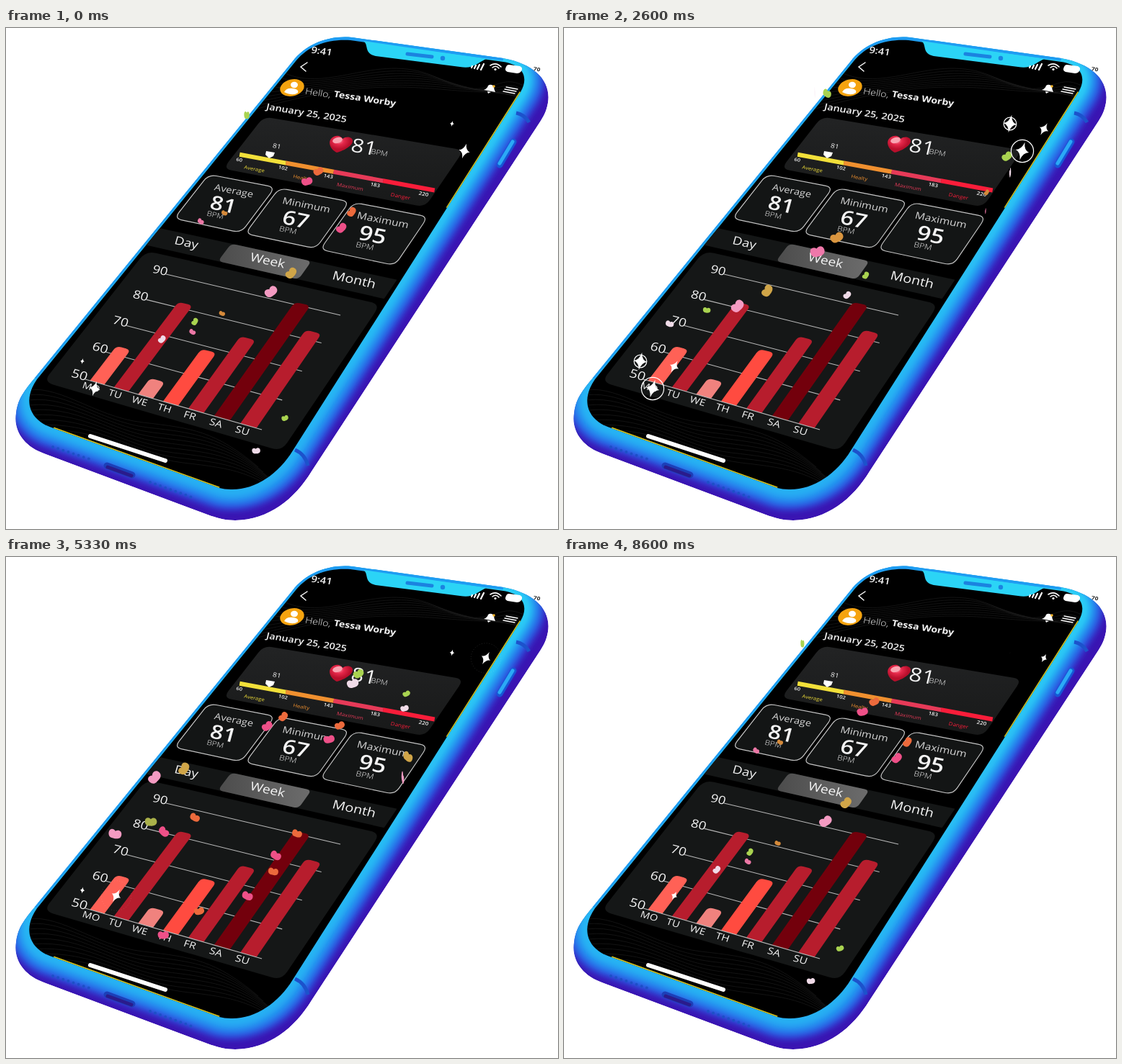
These frames come from a looping animation (766 by 696 pixels, 8630 ms). An HTML page with a canvas:

```html
<!DOCTYPE html>
<html lang="en">
<head>
<meta charset="utf-8">
<title>Heart rate app</title>
<style>
  html, body { margin: 0; width: 100%; height: 100%; overflow: hidden; background: #fff; }
  svg, canvas { position: absolute; left: 0; top: 0; width: 766px; height: 696px; }
  text { font-family: "Open Sans", "Noto Sans", sans-serif; text-anchor: middle; }
</style>
</head>
<body>
<svg viewBox="0 0 766 696">
  <defs>
    <path id="body" d="M40 486L398 46C415 24 445 10 480 13L690 42C735 50 757 75 752 104C750 115 747 121 742 129L424 616C400 655 365 683 318 684C305 684 295 681 285 678L55 592C25 582 10 560 14 535C16 515 26 503 40 486Z"/>
    <path id="screen" d="M43 488L402 46C420 24 447 15 478 17L690 47C715 51 727 66 714 89L398 587C378 620 345 642 312 641Q303 641 296 639L66 556C33 546 22 518 43 488Z"/>
    <clipPath id="inBody"><use href="#body"/></clipPath>
    <clipPath id="inScreen"><use href="#screen"/></clipPath>
    <filter id="soft" x="-10%" y="-10%" width="120%" height="120%"><feGaussianBlur stdDeviation="5"/></filter>
    <linearGradient id="rim" x1="0" y1="0" x2="0" y2="1"><stop stop-color="#2bd0f6"/><stop offset="1" stop-color="#27b0f3"/></linearGradient>
    <linearGradient id="card" x1="0" y1="0" x2="0" y2="1"><stop stop-color="#222324"/><stop offset="1" stop-color="#181919"/></linearGradient>
    <linearGradient id="pill"><stop stop-color="#4c4c4c"/><stop offset="1" stop-color="#6c6c6c"/></linearGradient>
    <radialGradient id="heart" cx=".4" cy=".3"><stop stop-color="#ff8fa4"/><stop offset=".45" stop-color="#e5284a"/><stop offset="1" stop-color="#b80f2c"/></radialGradient>
  </defs>

  <g clip-path="url(#inBody)">
    <use href="#body" fill="#3a14b2"/>
    <g fill="none" filter="url(#soft)">
      <use href="#screen" stroke="#2c5ae4" stroke-width="56"/>
      <use href="#screen" stroke="#248df0" stroke-width="38"/>
      <use href="#screen" stroke="url(#rim)" stroke-width="21"/>
    </g>
    <path d="M40 486L398 46C415 24 445 12 480 15L690 43" fill="none" stroke="#1e9cf2" stroke-width="5"/>
    <path d="M708 118Q719 120 726 131M401 586Q415 592 419 608" fill="none" stroke="#1c52cc" stroke-width="5"/>
    <g stroke-linecap="round">
      <path d="M704 158L685 190" stroke="#1557d6" stroke-width="9"/>
      <path d="M703 158L685 188" stroke="#2ba9f6" stroke-width="5"/>
      <path d="M140 608L175 621" stroke="#1c3fb8" stroke-width="9"/>
      <path d="M141 610L174 622" stroke="#2a1b8c" stroke-width="5"/>
      <path d="M65 582L116 599M200 631L258 652" stroke="#1d4fc8" stroke-width="4" stroke-dasharray="0 7.5"/>
    </g>
  </g>

  <use href="#screen" fill="#000"/>
  <g clip-path="url(#inScreen)">
    <g id="contours" fill="none" stroke="#191919" stroke-width=".8"/>
    <path d="M714 89L612 250M66 556L296 639" stroke="#d9c51f" stroke-width="3" fill="none"/>
    <g id="panels"></g>
  </g>
  <path d="M496 18C504 24 496 35 513 39L630 54C648 57 652 50 666 43Z" fill="#2bd4f6"/>
  <path d="M557 36L591 40" stroke="#1b83e0" stroke-width="5" stroke-linecap="round"/>
  <circle cx="606" cy="42" r="3.2" fill="#1b83e0"/>

  <g fill="none" stroke="#fff" stroke-linecap="round">
    <path d="M418 48L409 54L416 60" stroke-width="1.4"/>
    <path d="M647 53l-1 2M652 52l-2 4M657 51l-3 6M663 50l-4 8" stroke-width="2.2"/>
    <path d="M672 52Q680 47 687 54M675 55Q680 51 684 56" stroke-width="1.6"/>
    <path d="M694 82L710 85M692 85L708 88M690 88L706 91" stroke-width="1.3"/>
    <path d="M117 567L221 601" stroke-width="6"/>
  </g>
  <circle cx="679" cy="57.500" r="1.6" fill="#fff"/>
  <path d="M698 51L713 53Q718 55 715 60Q713 63 709 63L696 61Q691 59 694 54Q695 51 698 51Z" fill="#fff"/>
  <path d="M663 86Q668 84 669 80Q673 77 677 81Q677 85 679 89ZM668 88l5 1-4 2Z" fill="#fff"/>
  <circle cx="677" cy="81" r="1.8" fill="#f5b428"/>
  <ellipse cx="397" cy="83" rx="17" ry="11.500" transform="rotate(-14 397 83)" fill="#f5a30f"/>
  <ellipse cx="400" cy="79" rx="5" ry="4.200" fill="#fff"/>
  <path d="M386 89Q389 83 398 84Q407 85 405 90Q398 95 386 89Z" fill="#fff"/>

  <g id="info"></g>
  <path d="M459 173C449 168 446 157 453 152C459 148 465 150 467 154C472 150 480 151 481 156C482 163 470 170 459 173Z" fill="url(#heart)"/>
  <ellipse cx="460" cy="156" rx="7" ry="4" transform="rotate(-15 460 156)" fill="#f9a4b2"/>
  <path d="M361 171L373 173L371 178L365 181L360 176Z" fill="#fff"/>
</svg>
<canvas width="766" height="696"></canvas>

<script>
const LOOP = 8630, PULSE = 800;
const byId = id => document.getElementById(id);
const clamp = v => Math.max(0, Math.min(1, v));
const wrap = (v, n) => ((v % n) + n) % n;

// Perspective of the screen plane; the chart grid is the unit square.
const [a, b, c, d, e, f, g, h] = [212.4, -116.5, 222, 31.5, 126.1, 342, -0.0639, -0.0407];
const depth = (u, v) => 1 + g * u + h * v;
const project = (u, v) => {
  const w = depth(u, v);
  return [(a * u + b * v + c) / w, (d * u + e * v + f) / w];
};

// Box in the plane with rounded corners: radius r on top, low at the bottom.
function box(u1, v1, u2, v2, attrs, r = 0.1, low = r) {
  const pts = [project(u1, v1), project(u2, v1), project(u2, v2), project(u1, v2)];
  const toward = (p, q, dist) => {
    const k = dist / Math.hypot(q[0] - p[0], q[1] - p[1]);
    return [p[0] + (q[0] - p[0]) * k, p[1] + (q[1] - p[1]) * k];
  };
  const path = pts.map((p, i) => {
    const dist = i < 2 ? r : low;
    return `${i ? 'L' : 'M'}${toward(p, pts[(i + 3) % 4], dist)}Q${p} ${toward(p, pts[(i + 1) % 4], dist)}`;
  }).join('');
  return `<path d="${path}Z" ${attrs}/>`;
}

const row = (u1, u2, v, color, width) =>
  `<path d="M${project(u1, v)}L${project(u2, v)}" stroke="${color}" stroke-width="${width}"/>`;

// Text centred on a point of the plane, turned along its row.
function label(s, u, v, size, weight = 400, fill = '#f4f4f4') {
  const [x, y] = project(u, v);
  const slope = (d - g * y) / (a - g * x);
  const px = size / depth(u, v);
  return `<text transform="matrix(1.12 ${1.12 * slope} ${-slope - 0.05} .95 ${x} ${y})" y="${px * 0.36}" font-size="${px}" font-weight="${weight}" fill="${fill}">${s}</text>`;
}

const zones = [['Average', '#f2e03a'], ['Healty', '#f0902f'], ['Maximum', '#e63a58'], ['Danger', '#fa1d3a']];
const stats = [['Average', 81], ['Minimum', 67], ['Maximum', 95]];
const week = { MO: 62, TU: 81, WE: 55, TH: 68, FR: 75, SA: 90, SU: 82 };
const level = bpm => (90 - bpm) / 40;
const barColor = bpm =>
  bpm < 60 ? '#f0827e' : bpm < 65 ? '#ff6156' : bpm < 70 ? '#ff4b40' : bpm < 85 ? '#b71d2d' : '#73000c';

function drawContours() {
  let out = '';
  for (let k = 0; k < 63; k += 7) {
    out += `<path d="M${385 - k} ${62 + k}C${450 + k} ${92 - k / 2} ${520 + k} ${30 + k} ${600 + k} ${70 + k / 3}S${680 + k} ${50 + k} 730 ${88 + k}"/>`;
    out += `<path d="M20 ${505 + k}C${70 + k} ${490 + k} ${120 + k} ${540 + k} ${190 + k} ${548 + k}S${290 + k} ${560 + k} ${350 + k} ${610 + k}"/>`;
  }
  byId('contours').innerHTML = out;
}

function drawScreen() {
  const panels = [], info = [];

  info.push(
    label('9:41', -.09, -2.41, 14.5, 600), label('70', 1.14, -2.53, 7.5, 700, '#222'),
    label('Hello,', .071, -1.962, 13.4, 300), label('Tessa Worby', .351, -1.978, 13.2, 700),
    label('January 25, 2025', .092, -1.74, 13.4, 600));

  panels.push(box(-.13, -1.63, 1.05, -1.05, 'fill="url(#card)"', 12));
  info.push(label('81', .534, -1.502, 28, 500), label('BPM', .634, -1.472, 10.2, 300), label('81', .068, -1.362, 9.3, 500));
  zones.forEach(([name, color], i) => {
    const u = -.1 + i * .285;
    panels.push(row(u, u + .286, -1.215, color, 6));
    info.push(label(name, u + .14, -1.105, 7, 400, color));
  });
  [60, 102, 143, 183, 220].forEach((n, i) => info.push(label(n, -.08 + i * .27, -1.165, 6.9, 600)));

  stats.forEach(([name, bpm], i) => {
    const u = -.185 + i * .435, mid = u + .205;
    panels.push(box(u, -.97, u + .41, -.5, 'fill="#131515" stroke="#c4c4c4" stroke-width="1.2"', 11));
    info.push(label(name, mid, -.865, 13.2, 400, '#d6d6d6'), label(bpm, mid, -.72, 28.3, 600), label('BPM', mid, -.61, 10.2, 300));
  });

  const third = 1.4 / 3;
  panels.push(box(-.25, -.386, 1.15, -.21, 'fill="#141616"', 1));
  panels.push(box(-.25 + third, -.386, -.25 + 2 * third, -.21, 'fill="url(#pill)"', 7));
  ['Day', 'Week', 'Month'].forEach((s, i) => info.push(label(s, -.02 + i * .485, -.312, 16.4)));

  panels.push(box(-.2, -.16, 1.15, 1.11, 'fill="#151717"', 14));
  for (let n = 90; n > 50; n -= 10) panels.push(row(0, 1, level(n), '#b9b9b9', 1.1));
  for (let n = 90; n >= 50; n -= 10) info.push(label(n, -.046, level(n) - .023, 16));
  Object.entries(week).forEach(([day, bpm], i) => {
    const u = (i + .5) / 7;
    panels.push(box(u - .043, level(bpm) - .02, u + .043, 1, `fill="${barColor(bpm)}"`, 7, 0.1));
    info.push(label(day, u - .012, 1.045, 11.9));
  });
  panels.push(row(0, 1, 1, '#b9b9b9', 1.1));

  byId('panels').innerHTML = panels.join('');
  byId('info').innerHTML = info.join('');
}

const ctx = document.querySelector('canvas').getContext('2d');
const bean = new Path2D('M-9 -1C-9 -7 -3 -8 0 -4C3 -7 9 -6 9 0C9 6 3 7 -2 6C-7 6 -9 3 -9 -1Z');
const star = new Path2D('M0 -1Q.14 -.14 .75 0Q.14 .14 0 1Q-.14 .14 -.75 0Q-.14 -.14 0 -1Z');

// Petals drift in pairs; speed is the sideways pixels per second.
const kind = (lead, mate, size, speed) => ({ lead, mate, size, speed });
const coral = kind('#ec6a3c', '#ee5088', .85, 102);
const ember = { ...coral, speed: 150 };
const crumb = kind('#d58a3a', '#ec78a6', .52, 109);
const gold = kind('#d0a548', '#f49bc2', 1, 142);
const brass = { ...gold, size: 1.05, speed: 101 };
const amber = kind('#d9953f', '#ef78aa', 1.1, 96);
const olive = kind('#aab14a', '#f49bc2', 1, 149);
const snow = kind('#a9d350', '#f0dbe8', .9, 108);
const mist = { ...snow, size: .64, speed: 131 };

// A wave is what drifts in around one moment: kind, x, y and climb per second.
const pairs = [];
const wave = (at, ...items) => items.forEach(([type, x, y, climb]) =>
  pairs.push({ ...type, at, x, y, climb, turn: pairs.length * 1.7 }));

wave(0, [crumb, 303, 257, 11], [snow, 334, 121, -22], [mist, 262, 408, 66], [mist, 387, 542, 60]);
wave(1000, [amber, 225, 299, 5], [mist, 209, 390, 29]);
wave(2600, [brass, 282, 365, 32], [mist, 198, 392, 74], [snow, 365, 91, 60]);
wave(3930, [coral, 242, 289, 48], [coral, 261, 415, 22], [coral, 228, 479, 30], [coral, 352, 554, 40], [snow, 338, 242, 57]);
wave(5330, [ember, 463, 234, 40], [ember, 262, 362, 60], [coral, 268, 492, 45], [brass, 247, 294, 60], [olive, 201, 368, 95]);
wave(7330, [coral, 301, 285, 66], [coral, 347, 327, 55], [coral, 346, 555, 40], [crumb, 158, 437, 31], [gold, 211, 386, 35], [gold, 412, 350, 32]);

// Petals narrow to nothing at the borders of the screen.
function openness(x, y, top) {
  const left = x - (400 - 0.809 * (y - 42)) + 14;
  const right = 680 - 0.637 * (y - 110) - x;
  const bottom = 548 + (x - 60) * 0.357 - y;
  return clamp(Math.min(left / 24, right / 20, bottom / 20, (y - top) / 14));
}

function petal(x, y, size, turn, color, open) {
  if (open <= 0) return;
  ctx.save();
  ctx.translate(x, y);
  ctx.scale(open, 1);
  ctx.rotate(turn);
  ctx.scale(size, size);
  ctx.fillStyle = color;
  ctx.fill(bean);
  ctx.restore();
}

function drawPair(p, t) {
  const age = wrap(t - p.at + 1000, LOOP);
  if (age > 5500) return;
  const s = age / 1000 - 1;
  const x = p.x + p.speed * s, y = p.y - p.climb * s;
  // The partner's offset grows toward the viewer.
  const mx = x - 4 + 0.105 * (x - 512) - 0.056 * (y - 133);
  const my = y + 12 + 0.06 * (x - 512) + 0.1 * (y - 133);
  const top = Math.min(118, p.y - 60), grow = clamp(age / 300);
  const spin = Math.sin(p.turn + age / 900) * 0.8 - 0.3;
  petal(mx, my, p.size, spin + 0.2, p.mate, grow * openness(mx, my, top));
  petal(x, y, p.size * 0.92, spin, p.lead, grow * openness(x, y, top));
}

// Stars swell around their peak time and throw a ring that breaks into dots.
function sparkle(x, y, peak, tilt, t) {
  const gap = wrap(t - peak + PULSE / 2, PULSE) - PULSE / 2;
  const size = 13 * Math.cos(Math.PI * gap / 670);
  const k = (gap + 85) / 270;
  ctx.save();
  ctx.translate(x, y);
  if (k > 0 && k < 1) {
    const solid = k < .6;
    ctx.strokeStyle = '#fff';
    ctx.globalAlpha = solid ? 1 : (1 - k) * 2;
    ctx.lineWidth = solid ? 1.2 : .8;
    ctx.setLineDash(solid ? [] : [1, 2.5]);
    ctx.beginPath();
    ctx.arc(0, 0, 8 + 14 * k, 0, Math.PI * 2);
    ctx.stroke();
    ctx.globalAlpha = 1;
  }
  if (size > 0) {
    ctx.transform(1, .12, -.18, 1, 0, 0);
    ctx.rotate(tilt);
    ctx.scale(size, size);
    ctx.fillStyle = '#fff';
    ctx.fill(star);
  }
  ctx.restore();
}

function sparkleGroup(x, y, t) {
  sparkle(x, y, 270, 0, t);
  sparkle(x + 47, y + 7.5, 370, .35, t);
  sparkle(x + 17, y + 38, 140, .1, t);
}

function draw(now) {
  const t = now % LOOP;
  ctx.clearRect(0, 0, 766, 696);
  for (const p of pairs) drawPair(p, t);
  sparkleGroup(619, 133, t);
  sparkleGroup(106, 463, t);
}

drawContours();
drawScreen();
const start = performance.now();
function tick() {
  draw(performance.now() - start);
  requestAnimationFrame(tick);
}
tick();
</script>
</body>
</html>
```
